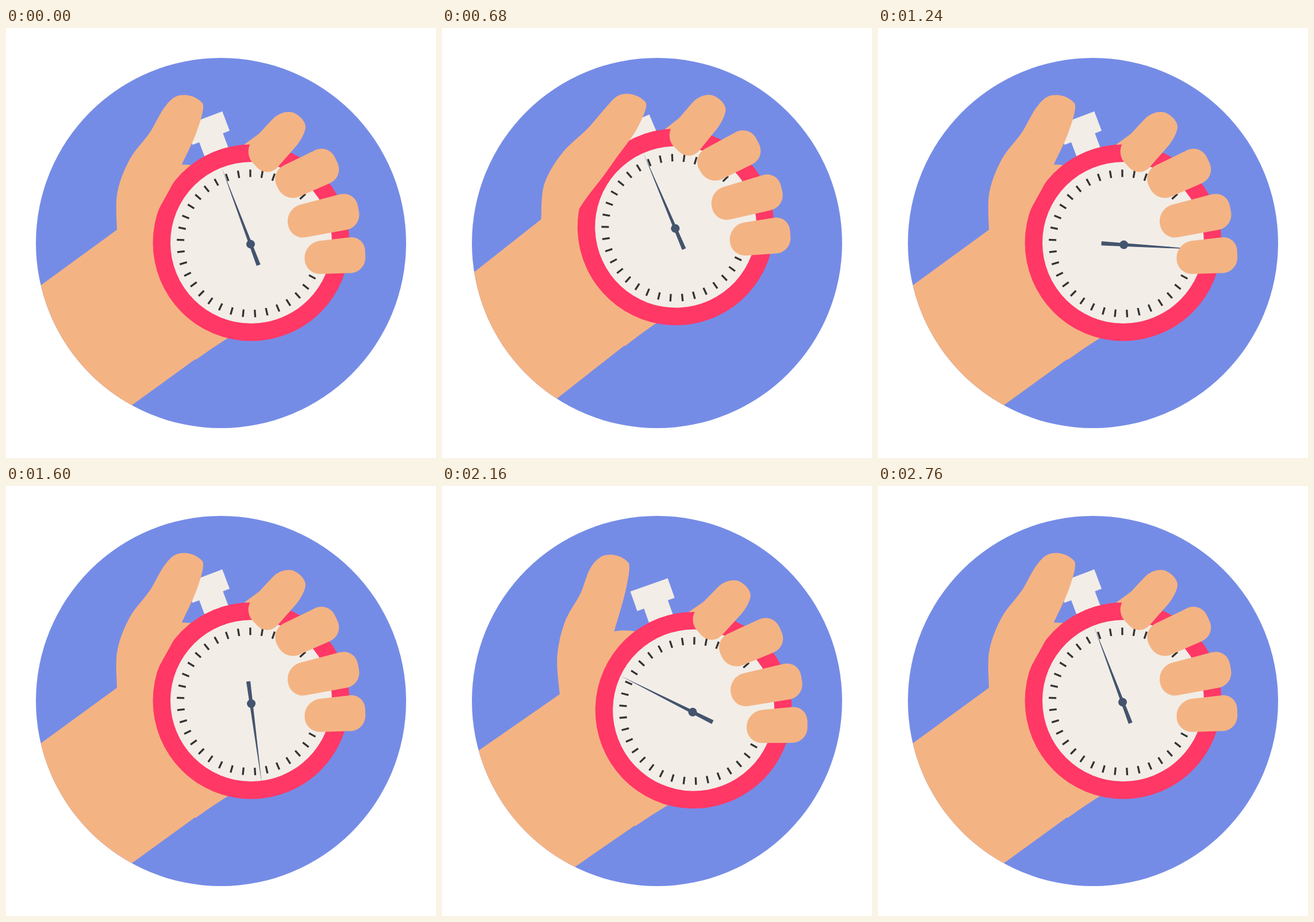
An HTML page that plays this animation: 748 px wide and 748 px high, repeating every 3000 ms.

```html
<!DOCTYPE html>
<html lang="en">
<head>
<meta charset="utf-8">
<title>Stopwatch</title>
<style>
html, body { margin: 0; width: 100%; height: 100%; overflow: hidden; background: #fff; }
svg { display: block; width: 100vw; height: 100vh; }
.skin { fill: #f4b383; }
.cream { fill: #f2ede7; }
.steel { fill: #44546e; }
</style>
</head>
<body>
<svg viewBox="0 0 748 748">
  <clipPath id="disc"><circle cx="374" cy="374" r="322"/></clipPath>
  <circle cx="374" cy="374" r="322" fill="#758ce6"/>
  <g clip-path="url(#disc)">
    <g id="hand">
      <path class="skin" d="M20 477L193 351L222 270L276 242Q297 235 325 239L400 260L414 203L440 184L460 260L420 520L385 540Q358 557 331 576.5L328 577L150 706H20Z"/>
      <g id="crown">
        <g class="cream" transform="translate(344 157.3) rotate(-20.7)">
          <path d="M-34.5 0H34.5V36H-34.5Z"/>
          <path d="M-22 30H22V90H-22Z"/>
        </g>
      </g>
      <circle cx="426.5" cy="373.5" r="171" fill="#ff3866"/>
      <circle class="cream" cx="426.5" cy="373.5" r="140.5"/>
      <path id="ticks" stroke="#333" stroke-width="3.3"/>
      <g id="needle">
        <g transform="translate(425.5 376) rotate(-20.7)">
          <path class="steel" d="M0-141L3.6 39H-3.6Z"/>
          <circle class="steel" r="7.5"/>
        </g>
      </g>
      <path id="fingers" class="skin"/>
    </g>
    <path id="thumb" class="skin"/>
  </g>
</svg>
<script>
const LOOP = 3000, STEP = 40, REPEAT = 1680;
const LIFT = 2, PRESS = -2.41;
const ELBOW = { x: -290, y: 870 };
const RAD = Math.PI / 180;

const el = id => document.getElementById(id);
const clamp = x => Math.max(0, Math.min(1, x));
const ease = x => x * x * (3 - 2 * x);
const span = (t, a, b) => clamp((t - a) / (b - a));
const mix = (p, q, k) => [p[0] + (q[0] - p[0]) * k, p[1] + (q[1] - p[1]) * k];
const fix = p => p.map(v => v.toFixed(2)).join(' ');

// Corner points of each finger, rounded off when drawn
const fingers = [
  [[482, 139], [521, 157], [521, 187], [455, 262], [411, 215]],
  [[459, 251], [561, 201], [588, 259], [486, 304]],
  [[486, 314], [607, 282.5], [619, 346], [495, 369]],
  [[519, 373.5], [624, 361], [626, 425.5], [520, 428.5]]
];

// Key points along the resting thumb, from wrist over the tip to the palm
const thumbKeys = [
  [193, 351], [193.5, 287], [215, 229], [250, 182], [273, 142], [293, 120.5], [316, 117],
  [336, 125.5], [343, 140], [330, 185], [306, 237], [290, 271], [266, 315], [250, 350]
];

function rounded(corners, radius) {
  const n = corners.length;
  return corners.map((c, i) => {
    const cut = other => {
      const len = Math.hypot(other[0] - c[0], other[1] - c[1]);
      return mix(c, other, Math.min(radius / len, 0.5));
    };
    const a = cut(corners[(i + n - 1) % n]), b = cut(corners[(i + 1) % n]);
    return (i ? 'L' : 'M') + fix(a) + 'C' + [mix(a, c, 0.56), mix(b, c, 0.56), b].map(fix).join(' ');
  }).join('') + 'Z';
}

// Catmull-Rom curve through the points
function smooth(pts) {
  const at = i => pts[Math.max(0, Math.min(pts.length - 1, i))];
  const handle = (i, s) => at(i).map((v, k) => v + s * (at(i + 1)[k] - at(i - 1)[k]) / 6);
  let d = 'M' + fix(pts[0]);
  for (let i = 1; i < pts.length; i++) {
    d += 'C' + [handle(i - 1, 1), handle(i, -1), pts[i]].map(fix).join(' ');
  }
  return d + 'Z';
}

function tickMarks() {
  let d = '';
  for (let i = -5; i <= 25; i++) {
    const a = (i * 9.65 + 0.25) * RAD;
    const at = r => fix([425.5 - r * Math.sin(a), 374.8 - r * Math.cos(a)]);
    d += 'M' + at(115.5) + 'L' + at(128.5);
  }
  return d;
}

// Tilt of the hand in degrees: wind up, press, return
function tiltAt(t) {
  const s = t >= 240 + REPEAT ? t - REPEAT : t;
  return LIFT * ease(span(s, 240, 400))
    + (PRESS - LIFT) * ease(span(s, 400, 720))
    - PRESS * ease(span(s, 720, 1080));
}

// The thumb's base turns with the hand, its tip slides sideways, points between blend
function bend([x, y], tilt) {
  const c = Math.cos(tilt * RAD), s = Math.sin(tilt * RAD);
  const dx = x - ELBOW.x, dy = y - ELBOW.y;
  const base = [ELBOW.x + dx * c - dy * s, ELBOW.y + dx * s + dy * c];
  const lean = tilt * (tilt > 0 ? 13 : 5.4);
  const tip = [x - lean, y + 0.17 * lean];
  return mix(base, tip, clamp((274.5 + 0.3 * x - y) / 220));
}

function draw(t) {
  const tilt = tiltAt(t);
  const push = 15 * Math.max(0, -tilt);
  el('hand').setAttribute('transform', `rotate(${tilt} ${ELBOW.x} ${ELBOW.y})`);
  el('crown').setAttribute('transform', `translate(${push * 0.35} ${push * 0.937})`);
  el('needle').setAttribute('transform', `rotate(${360 * span(t, 720, 2360)} 426.2 377.2)`);
  el('thumb').setAttribute('d', smooth(thumbKeys.map(p => bend(p, tilt))));
}

el('ticks').setAttribute('d', tickMarks());
el('fingers').setAttribute('d', fingers.map(f => rounded(f, 27)).join(''));

const start = performance.now();
function tick() {
  const t = (performance.now() - start) % LOOP;
  draw(Math.floor(t / STEP) * STEP);
  requestAnimationFrame(tick);
}
tick();
</script>
</body>
</html>
```
